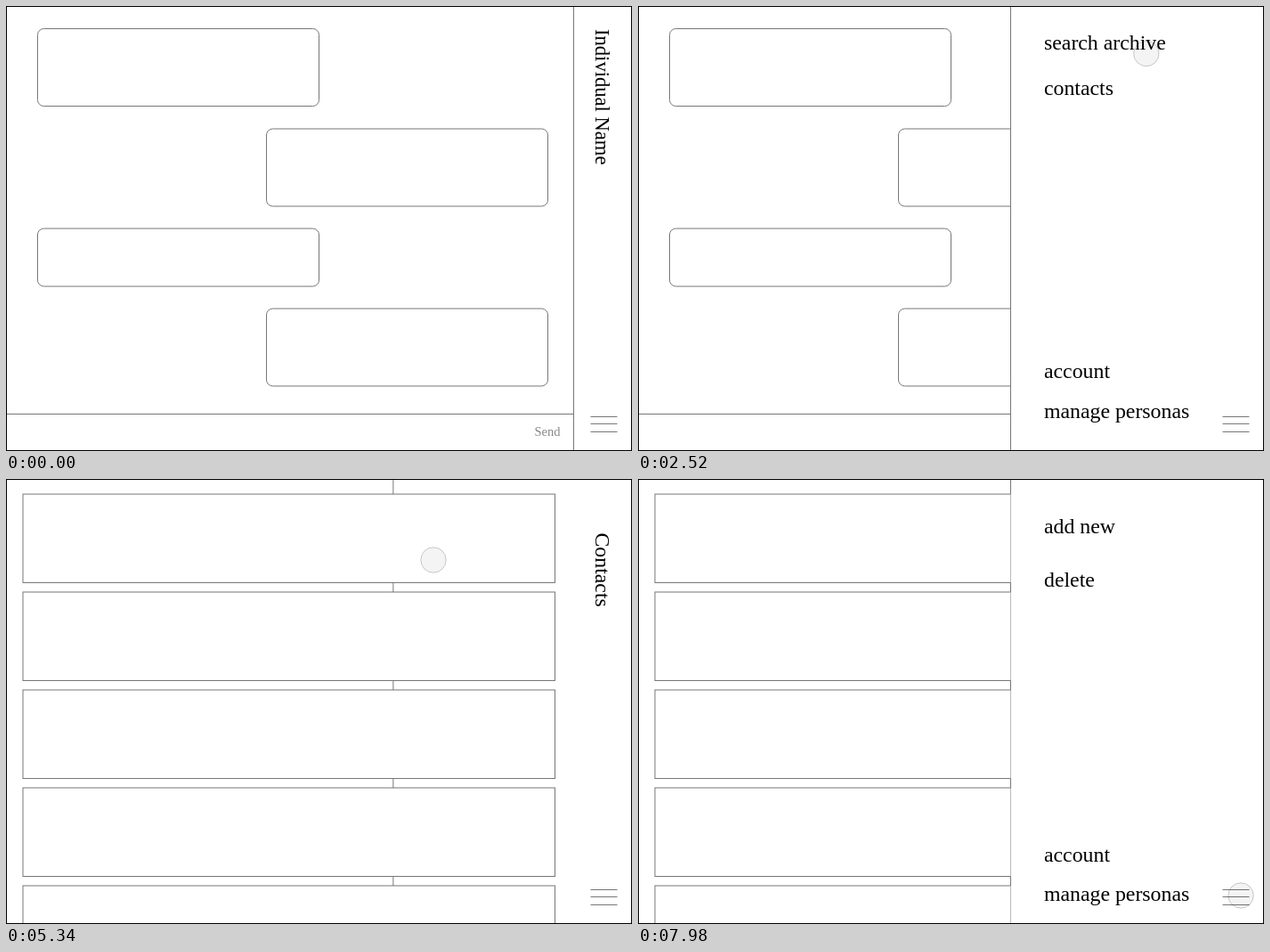
These frames come from a looping animation (703 px wide and 500 px high, 8000 ms). An HTML page:

```html
<!DOCTYPE html>
<html lang="en">
<head>
<meta charset="utf-8">
<title>Sliding menu wireframe</title>
<style>
  html, body { margin: 0; width: 100%; height: 100%; overflow: hidden; background: #fff; }
  svg { display: block; width: 100%; height: 100%; }
  text { font-family: "Liberation Serif", "Times New Roman", serif; font-size: 23.8px; fill: #000; }
  .wire { fill: #fff; stroke: #777; }
  .line { fill: none; stroke: #777; }
  #send { font-size: 14.5px; fill: #888; }
</style>
</head>
<body>
<svg viewBox="0 0 703 500">
  <defs>
    <clipPath id="page"><rect id="pageRect" width="637" height="500"/></clipPath>
    <clipPath id="cut"><rect id="cutRect" width="703" height="500"/></clipPath>
  </defs>
  <rect width="703" height="500" fill="#fff"/>
  <g id="chat" clip-path="url(#page)"><path class="line" d="M1 458.5H640"/></g>
  <path id="edge" class="line" d="M0 0V500"/>
  <g id="list" clip-path="url(#cut)"></g>
  <g clip-path="url(#page)"><text id="send" x="593.5">Send</text></g>
  <text id="name" transform="translate(662 26)rotate(90)" style="font-size:22.6px">Individual Name</text>
  <text id="title" transform="translate(662 60.5)rotate(90)">Contacts</text>
  <g id="mainMenu"></g>
  <g id="listMenu"></g>
  <path id="burger" class="line" d="M656.5 461.5h30m-30 8h30m-30 9h30"/>
  <g id="search">
    <path class="line" d="M439 29.5L430 38.5L439 47.5"/>
    <g class="line"><circle cx="662" cy="37" r="4.3"/><path d="M665 40l5 5"/></g>
  </g>
  <circle id="cursor" r="14.2" fill="#000" fill-opacity=".045" stroke="#000" stroke-opacity=".2"/>
  <rect x=".5" y=".5" width="702" height="499" fill="none" stroke="#000"/>
</svg>
<script>
const LOOP = 8000, OPEN = 418.5, SHUT = 637.5;
const $ = id => document.getElementById(id);

function add(parent, tag, attrs, first) {
  const el = document.createElementNS("http://www.w3.org/2000/svg", tag);
  for (const k in attrs) el.setAttribute(k, attrs[k]);
  first ? parent.prepend(el) : parent.append(el);
  return el;
}
const box = (parent, x, y, width, height, rx = 0, first) =>
  add(parent, "rect", { x, y, width, height, rx, class: "wire" }, first);

box($("chat"), 35.5, 25.5, 316, 87, 7);
box($("chat"), 292.5, 138, 316, 87, 7);
box($("chat"), 35.5, 250, 316, 65, 7);
box($("chat"), 292.5, 340, 316, 87, 7);
for (let i = 0; i < 5; i++) {
  box($("list"), 19, 17 + 110 * i, 597.5, 99.5);
  box($("search"), 450.5, 82 + 99.6 * i, 232, 89.5, 0, true);
}
box($("search"), 450.5, 21.5, 232, 35, 0, true);

function menu(parent, items) {
  for (const [label, y] of items) add(parent, "text", { x: 456, y }).textContent = label;
}
menu($("mainMenu"), [["search archive", 49], ["contacts", 100], ["account", 418], ["manage personas", 463]]);
menu($("listMenu"), [["add new", 61], ["delete", 121], ["account", 430], ["manage personas", 474]]);

const ramp = (t, a, b) => Math.min(1, Math.max(0, (t - a) / (b - a)));
const smooth = p => p * p * (3 - 2 * p);
const cubic = p => p < .5 ? 4 * p ** 3 : 1 - 4 * (1 - p) ** 3;
const fade = (id, v) => $(id).setAttribute("opacity", v);
const show = (id, on) => fade(id, on ? 1 : 0);

// start, end, target x, target y
const moves = [
  [840, 1600, 673, 470],
  [2220, 2580, 569, 46],
  [3000, 3750, 443, 32],
  [3790, 3850, 438, 34],
  [3870, 4320, 480, 91],
  [5910, 6610, 677, 468]
];

function cursorAt(t) {
  let x = 625, y = 83;
  for (const [a, b, tx, ty] of moves) {
    const p = cubic(ramp(t, a, b));
    x += (tx - x) * p;
    y += (ty - y) * p;
  }
  return [x, y];
}

function edgeAt(t) {
  if (t < 4800) return SHUT + (OPEN - SHUT) * ramp(t, 1630, 1980);
  if (t < 6000) return OPEN + (SHUT - OPEN) * smooth(ramp(t, 5305, 5520));
  return SHUT + (OPEN - SHUT) * ramp(t, 6626, 6975);
}

function draw(t) {
  const edge = edgeAt(t);
  const swap = ramp(t, 4800, 5250);
  const searching = t >= 2910 && t < 3810;
  const [x, y] = cursorAt(t);

  $("edge").setAttribute("transform", `translate(${edge})`);
  $("pageRect").setAttribute("width", edge);
  $("cutRect").setAttribute("width", t < 6000 ? 703 : edge);
  $("send").setAttribute("y", t < 4800 ? 483 : 494);

  fade("chat", 1 - swap);
  fade("list", swap);
  fade("name", 1 - ramp(t, 1630, 1980));
  fade("title", t < 6626 ? swap : 0);
  fade("mainMenu", t < 1640 || searching ? 0 : 1 - swap);
  show("listMenu", t >= 6640);
  show("search", searching);
  show("burger", !searching);

  $("cursor").setAttribute("transform", `translate(${x} ${y})`);
  fade("cursor", ramp(t, 30, 750));
}

const start = performance.now();
function tick() {
  draw((performance.now() - start) % LOOP);
  requestAnimationFrame(tick);
}
draw(0);
requestAnimationFrame(tick);
</script>
</body>
</html>
```
